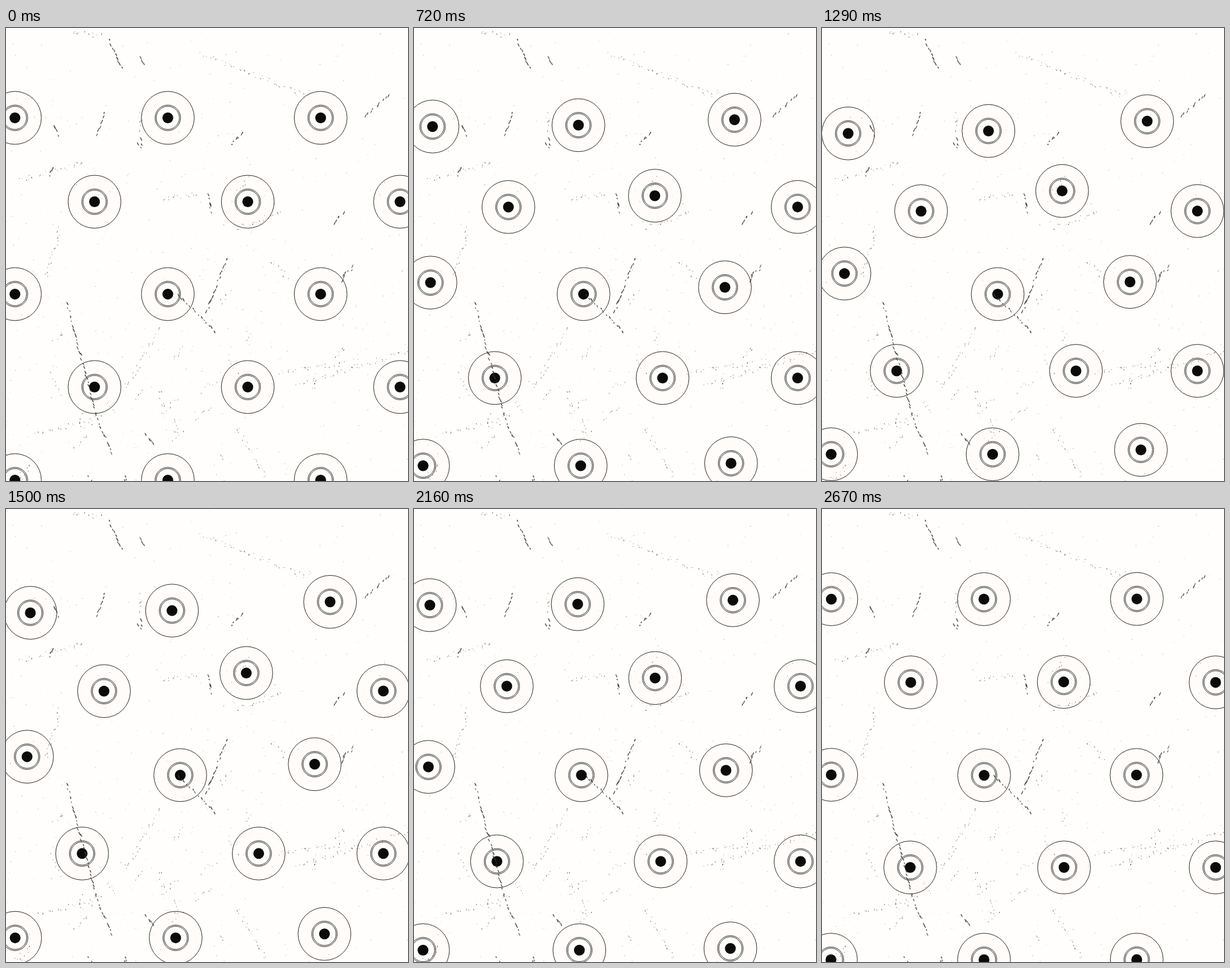
Recreate the animation shown at these times as an HTML page with a canvas. Size 706 by 794 pixels, loop 2.7 s.

```html
<!DOCTYPE html>
<html lang="en">
<head>
<meta charset="utf-8">
<title>Drifting eyes</title>
<style>
  html, body { margin: 0; width: 100%; height: 100%; overflow: hidden; background: #fffefc; }
  canvas { display: block; }
</style>
</head>
<body>
<canvas id="stage" width="706" height="794"></canvas>
<script>
const W = 706, H = 794, LOOP = 2700, TURN = 1325, STEP = 30, TAU = Math.PI * 2;
const INK = '#0b0c0a', PAPER = '#fffefc', IRIS = '#fffcfa', GRIT = '#3a3a38';
const ctx = document.getElementById('stage').getContext('2d');

// Staggered grid: every row drifts out, then returns to y + settle
const columns = [[15.7, 284.2, 552.6], [155.5, 424.6, 692]];
const rows = [
  { y: 157.5, settle: 0, drift: [[31, 28], [8.4, 23.6], [19, 6]] },
  { y: 304.5, settle: -1, drift: [[19, 17], [-3, -19.4], [-33.6, 16.8]] },
  { y: 466.4, settle: 0.3, drift: [[24.4, -37], [25, 0], [-12, -21.9]] },
  { y: 629.3, settle: -0.4, drift: [[-25, -29.1], [22, -29.1], [-33.6, -29.1]] },
  { y: 792.5, settle: -1.5, drift: [[0.4, -46.6], [15.8, -46.6], [7.7, -54.5]] }
];

// Main cracks in the grain: x1, y1, x2, y2
const darkCracks = [
  [180, 20, 204, 73], [235, 50, 245, 68], [173, 146, 160, 190], [82, 168, 94, 190],
  [420, 180, 393, 206], [674, 114, 628, 157], [355, 291, 361, 327], [388, 404, 352, 498],
  [300, 466, 369, 533], [106, 479, 160, 684], [160, 684, 186, 748]
];
const fineCracks = [
  [112, 6, 168, 15], [340, 44, 522, 117], [22, 268, 140, 236], [270, 300, 336, 292],
  [404, 350, 488, 322], [95, 350, 70, 438], [272, 520, 206, 640], [476, 605, 595, 588],
  [508, 628, 706, 565], [50, 715, 168, 680], [405, 700, 460, 790]
];

let seed = 7;
const rand = (lo = 0, hi = 1) => {
  seed = (seed * 16807) % 2147483647;
  return lo + (hi - lo) * seed / 2147483647;
};

function makeGrain() {
  const layer = document.createElement('canvas');
  layer.width = W;
  layer.height = H;
  const g = layer.getContext('2d');
  g.fillStyle = GRIT;

  const speck = (x, y, length, width, lean, alpha) => {
    g.globalAlpha = alpha;
    g.beginPath();
    g.ellipse(x, y, length / 2, width / 2, lean, 0, TAU);
    g.fill();
  };
  const trail = ([x1, y1, x2, y2], gap, spread, mark) => {
    const n = Math.ceil(Math.hypot(x2 - x1, y2 - y1) / gap);
    const lean = x2 < x1 ? 2 : 1.1;
    for (let i = 0; i < n; i++) {
      const k = (i + rand(0.2, 0.8)) / n;
      mark(x1 + (x2 - x1) * k + rand(-spread, spread),
           y1 + (y2 - y1) * k + rand(-spread, spread), lean);
    }
  };
  const dash = (x, y, lean) => speck(x, y, rand(2.5, 8), rand(1.2, 2), lean, 0.9);
  const dot = (x, y, lean) => speck(x, y, rand(1, 3.2), rand(0.8, 1.4), lean, rand(0.4, 0.9));

  for (const c of darkCracks) trail(c, 7, 1.5, dash);
  for (const c of fineCracks) trail(c, 5.5, 4, dot);

  // Minor cracks, denser towards the lower left
  for (let i = 0; i < 34; i++) {
    const low = i % 2;
    const x = low ? rand(20, 420) : rand(0, W), y = low ? rand(570, H) : rand(80, H);
    const crack = [x, y, x + rand(-30, 30), y + rand(10, 40)];
    trail(crack, 6, 4, i % 5 ? dot : dash);
  }
  for (let i = 0; i < 500; i++)
    speck(rand(0, W), H * rand() ** 0.8, rand(0.8, 2), rand(0.7, 1.2), 1.3, rand(0.15, 0.6));
  return layer;
}
const grain = makeGrain();

function disc(x, y, r, fill, outlined) {
  ctx.beginPath();
  ctx.arc(x, y, r, 0, TAU);
  ctx.fillStyle = fill;
  ctx.fill();
  if (outlined) ctx.stroke();
}

function drawEye(x, y) {
  disc(x, y, 46.4, IRIS, true);
  disc(x, y, 22.4, PAPER, true);
  disc(x, y, 20.3, PAPER, true);
  disc(x, y, 9.5, INK);
}

function draw(now) {
  const t = Math.floor(now % LOOP / STEP) * STEP;
  const returning = t > TURN;
  const p = returning ? (LOOP - t) / (LOOP - TURN) : t / TURN;
  ctx.fillStyle = PAPER;
  ctx.fillRect(0, 0, W, H);
  ctx.strokeStyle = INK;
  ctx.lineWidth = 0.9;
  rows.forEach(({ y, settle, drift }, r) => {
    const home = y + (returning ? settle * (1 - p) : 0);
    drift.forEach(([dx, dy], c) => drawEye(columns[r % 2][c] + dx * p, home + dy * p));
  });
  ctx.drawImage(grain, 0, 0);
}

const start = performance.now();
function tick() {
  draw(performance.now() - start);
  requestAnimationFrame(tick);
}
tick();
</script>
</body>
</html>
```
